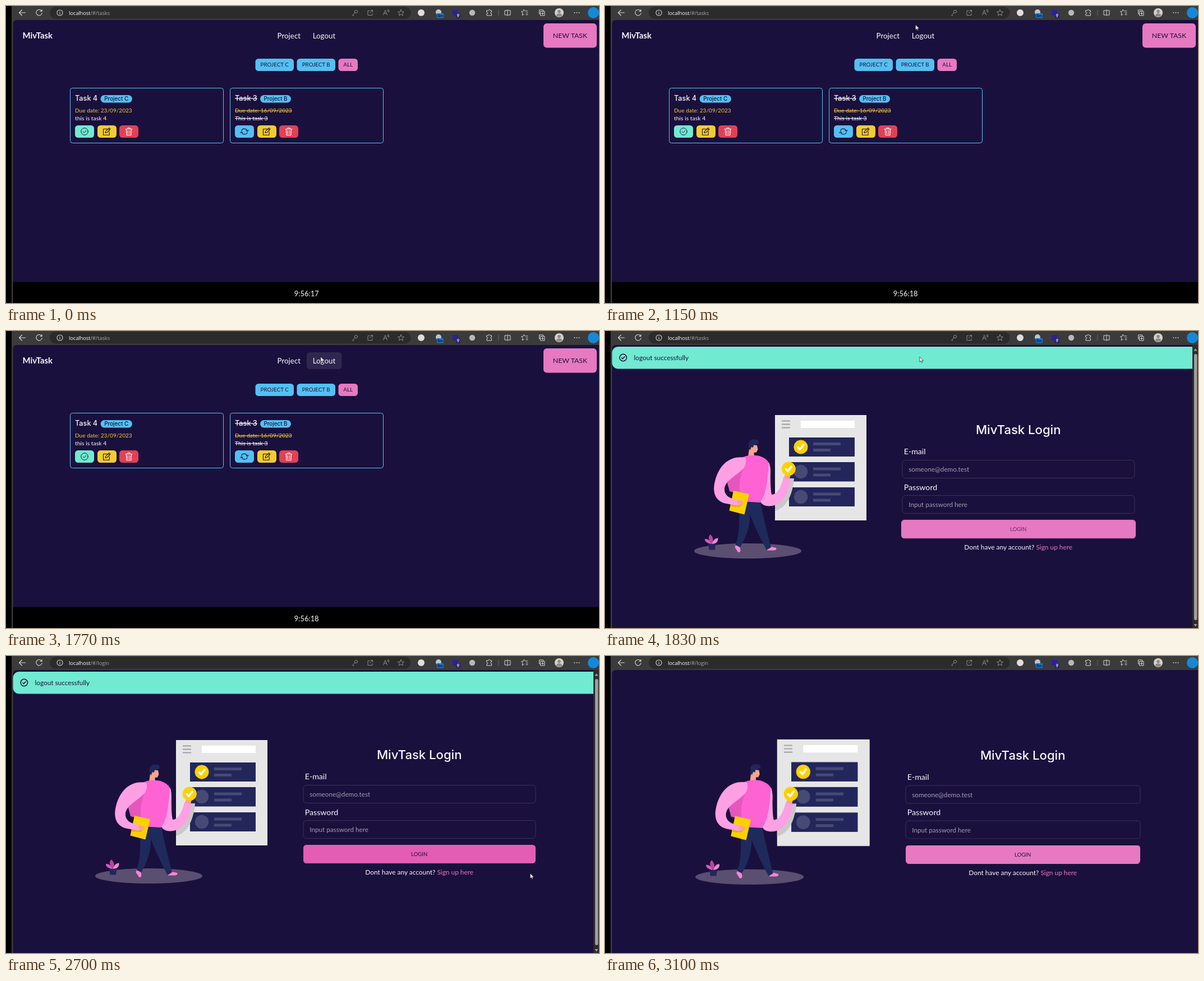
An HTML page for the animation above (3800 ms loop, 1057 px wide and 530 px high).

```html
<!DOCTYPE html>
<html lang="en">
<head>
<meta charset="utf-8">
<title>Task list</title>
<style>
html, body { margin: 0; height: 100%; overflow: hidden; background: #000; }
svg { display: block; width: 100vw; height: 100vh; }
text { font-family: Lato, "Open Sans", sans-serif; fill: #f9f7fd; }
.head, .badge { font-family: Inter, Roboto, sans-serif; font-weight: 500; }
.url { font: 9.5px "Open Sans", "Noto Sans", sans-serif; letter-spacing: -.15px; }
.url tspan { fill: #a3a3a3; }
.mid { text-anchor: middle; }
.dark { fill: #1f1238; }
.due { font-size: 10.1px; fill: #f3cc30; }
.note { font-size: 10.4px; }
.badge { font-size: 9.8px; }
.nav { font-size: 13.4px; }
.tab { font-size: 9.8px; }
.label { font-size: 14.2px; }
.hint { font-size: 11.7px; fill: #a29cb3; }
.done text { text-decoration: line-through; }
.done .badge { text-decoration: none; }
.field { fill: none; stroke: #3b3258; }
.line { fill: none; stroke-linecap: round; stroke-linejoin: round; }

/* one 3800 ms clock for everything */
.anim { animation: 3800ms linear infinite; }
.cut { animation: 3800ms step-end infinite; }

.first { animation-name: first; }
.second { animation-name: second; }
@keyframes first { 0% { visibility: visible } 18.1%, 100% { visibility: hidden } }
@keyframes second { 0% { visibility: hidden } 18.1%, 100% { visibility: visible } }

.tasks { animation-name: tasks; }
.login { animation-name: login; }
@keyframes tasks { 0% { visibility: visible } 48.12%, 100% { visibility: hidden } }
@keyframes login { 0% { visibility: hidden } 48.12%, 100% { visibility: visible } }
.tasks .cut { visibility: inherit; }
.clock { animation-name: clock; }
@keyframes clock { 0% { opacity: 1 } 48.12%, 100% { opacity: 0 } }

.old { animation-name: old; }
.new { animation-name: new; }
@keyframes old { 0% { visibility: visible } 56.8%, 100% { visibility: hidden } }
@keyframes new { 0% { visibility: hidden } 56.8%, 100% { visibility: visible } }

.toast { animation-name: toast; }
@keyframes toast { 0% { visibility: hidden } 48.12% { visibility: visible } 77.9%, 100% { visibility: hidden } }

/* the page widens when the scrollbar leaves */
.art { animation-name: art; }
.left { animation-name: left; }
.center { animation-name: center; }
.wide { animation-name: wide; }
@keyframes art { 0% { transform: none } 77.9%, 100% { transform: translate(.06px, -2.98px) scale(1.0122) } }
@keyframes left { 0% { transform: none } 77.9%, 100% { transform: translate(6px, .5px) } }
@keyframes center { 0% { transform: none } 77.9%, 100% { transform: translate(8px, .7px) } }
@keyframes wide { 0% { width: 414px } 77.9%, 100% { width: 418px } }

.pill { animation-name: pill; }
@keyframes pill { 0%, 26.8% { fill: #2b2b2b } 27.5%, 28.6% { fill: #333 } 29.8%, 100% { fill: #2b2b2b } }

.hover { animation-name: hover; }
@keyframes hover { 0%, 42.8% { opacity: 0 } 46.3%, 100% { opacity: .1 } }

.press { animation-name: press; transform-box: fill-box; transform-origin: center; }
@keyframes press {
  0%, 48.1% { transform: scale(1.01); fill: #e779c1 }
  52.6% { transform: none }
  65.8% { transform: none; fill: #e779c1 }
  69.2%, 71.2% { fill: #e35db4 }
  76.3%, 100% { transform: none; fill: #e779c1 }
}
.caption { animation-name: caption; }
@keyframes caption { 0%, 48.1% { opacity: .7 } 52.6%, 100% { opacity: 1 } }

.cursor { animation-name: move; }
.shown { animation-name: shown; }
@keyframes shown { 0% { visibility: hidden } 12.6% { visibility: visible } 78%, 100% { visibility: hidden } }
@keyframes move {
  0%, 13.2% { transform: translate(883.5px, 510px) }
  17% { transform: translate(790px, 345px) }
  20.5% { transform: translate(630px, 90px) }
  23.1%, 26.8% { transform: translate(552px, -14px) }
  28.8% { transform: translate(551px, 12px) }
  30.3%, 31.6% { transform: translate(553.5px, 33.5px) }
  37.9%, 56.8% { transform: translate(560.8px, 45.8px) }
  60.5% { transform: translate(660px, 130px) }
  65.8% { transform: translate(870px, 318px) }
  69.2% { transform: translate(922px, 360px) }
  71.1% { transform: translate(934.5px, 388px) }
  72.9% { transform: translate(972px, 432px) }
  74.5% { transform: translate(1002px, 467px) }
  77.9%, 100% { transform: translate(1048px, 534px) }
}
</style>
</head>
<body>
<svg viewBox="0 0 1057 530">
<defs>
  <g id="tick" class="line" stroke="#1f1238"><circle r="6.2"/><path d="M-2.6 .2L-.7 2.1L2.8-1.7"/></g>
  <g id="edit" class="line" stroke="#1f1238" stroke-width="1.1">
    <path d="M1-4.5H-6V6.3H4.6V0M-2.5 2.5L-1.8-.4L4.3-6.4L6.5-4.2L.4 1.8Z M2.8-4.9L5-2.7"/>
  </g>
  <g id="trash" class="line" stroke="#fff" stroke-width="1.1">
    <path d="M-5.8-4.5H5.8M-2-4.6V-6.5H2V-4.6M-4.7-4.4L-4 6.5H4L4.7-4.4M-1.9-2L-1.6 4.2M1.9-2L1.6 4.2"/>
  </g>
  <g id="cycle" class="line" stroke="#1f1238" stroke-width="1.1">
    <path d="M-5.2-1C-4.5-6.2 3.5-6.2 5.2-1M5.2 1C4.5 6.2-3.5 6.2-5.2 1M3-1.5L5.3-.8L7.3-2.2M-3 1.5L-5.3 .8L-7.3 2.2"/>
  </g>
  <g id="card">
    <rect x="114.5" y="146.5" width="273" height="98" rx="4" fill="none" stroke="#58c7f3"/>
    <rect x="163" y="213" width="34" height="22" rx="5.5" fill="#f3cc30"/>
    <rect x="202" y="213" width="34" height="22" rx="5.5" fill="#e24056"/>
    <use href="#edit" x="179.5" y="224"/><use href="#trash" x="219" y="224"/>
  </g>
  <path id="star" d="M0-5.5L1.6-1.8L5.5-1.5L2.5 1.1L3.5 5L0 2.9L-3.5 5L-2.5 1.1L-5.5-1.5L-1.6-1.8Z"/>
  <g id="bars" fill="#474a75"><path d="M371 199h49v5h-49zM371 210h31v5h-31z"/></g>
  <g id="medal"><circle r="12.5" fill="#ffd000"/><path class="line" d="M-5 .5L-1.4 4.2L5-4" stroke="#fff" stroke-width="3.6"/></g>
</defs>

<rect width="1057" height="530"/>
<rect x="10" width="1047" height="530" fill="#3b3b3b"/>
<path d="M12.5 530V32Q12.5 25 19.5 25H1057V530Z" fill="#1a103d"/>

<!-- browser bar -->
<rect class="anim pill" x="78" y="1.5" width="643.5" height="21" rx="10.5" fill="#2b2b2b"/>
<g class="line" stroke="#d8d8d8" stroke-width="1.1">
  <path d="M34.5 12H23.5M28.5 7L23.5 12L28.5 17M63.5 9A5.2 5.2 0 1 0 64.2 12.5M64 6.5V9.5H61"/>
  <circle cx="96" cy="12" r="5"/><path d="M96 11.5V14.5M96 9.3V9.5"/>
</g>
<text class="url cut old" x="112" y="15.5">localhost<tspan>/#/tasks</tspan></text>
<text class="url cut new" x="112" y="15.5">localhost<tspan>/#/login</tspan></text>
<g class="line" stroke="#8b8b8b">
  <circle cx="624" cy="10" r="2.6"/><path d="M622 12L617.8 16.2V17H620M648 8.5H645V16.5H653V13.5M650 7.5H653.5V11M653.3 7.7L648.5 12.5"/>
  <path d="M672.5 16L676 7.5L679.5 16M674 13H678M680 7Q681.3 8.3 680.8 10.3M681.5 6Q683.5 8 682.5 11"/>
  <use href="#star" x="704" y="12"/>
</g>
<circle cx="740" cy="12" r="6" fill="#e4dcdc"/>
<circle cx="771" cy="11" r="5" fill="#b9c4cf"/>
<rect x="768" y="13" width="12" height="8.5" rx="1" fill="#1976d2"/>
<text class="mid" x="774" y="20" font-size="7" font-weight="700" style="fill:#061a33">8m</text>
<rect x="796" y="7" width="10" height="10" fill="#2d209b"/>
<rect x="802" y="13" width="8" height="9" rx="1" fill="#28246f"/>
<text class="mid" x="806" y="20.3" font-size="7.5" font-weight="700">9</text>
<circle cx="831" cy="12" r="5.2" fill="#b8b8b8"/>
<g class="line" stroke="#d8d8d8">
  <path d="M857 8H860C859.5 5.8 863.2 5.8 862.8 8H865.5V11C863 10.5 863 14 865.5 13.5V17H857V13.8C859.5 14.2 859.5 10.6 857 11Z"/>
  <path d="M878 7V17" stroke="#666"/>
  <path d="M893 8H889V16H893M895 8H899V16H895M894 6.5V17.5M926 9H930M927 12.5H930M927 15.5H930"/>
  <path d="M925 8.8L923.2 6.2L921.8 9.6L918.5 10L921 12.4L920.2 16.5L923.2 14.7"/>
  <path d="M952 14H950.5V7H957.5V8.5M953 9.5H960V17H953ZM956.5 11.2V15.3M954.5 13.2H958.5"/>
</g>
<circle cx="986" cy="12" r="8" fill="#d5d0cc"/>
<circle cx="986" cy="9.7" r="2.8" fill="#8e8985"/><path d="M980.8 17.2Q981 13.2 986 13.2T991.2 17.2Q986 21.4 980.8 17.2Z" fill="#8e8985"/>
<g fill="#d8d8d8"><circle cx="1013.5" cy="12" r=".9"/><circle cx="1017.5" cy="12" r=".9"/><circle cx="1021.5" cy="12" r=".9"/></g>
<circle cx="1047" cy="12" r="10" fill="#1688d8"/>

<!-- task list -->
<g class="cut tasks">
  <text x="29.5" y="58" font-size="14.8" font-weight="700">MivTask</text>
  <rect class="anim hover" x="536" y="38" width="62.5" height="30" rx="5.5" fill="#f9f7fd" opacity="0"/>
  <text class="nav mid" x="504.3" y="58">Project</text>
  <text class="nav mid" x="567" y="58">Logout</text>
  <rect x="958" y="31" width="95" height="43.5" rx="6" fill="#e779c1"/>
  <text class="dark mid" x="1005.5" y="57" font-size="12.3">NEW TASK</text>

  <rect x="444.5" y="94" width="68.5" height="22" rx="5.5" fill="#53c0f3"/>
  <rect x="518.5" y="94" width="68.5" height="22" rx="5.5" fill="#53c0f3"/>
  <rect x="592.5" y="94" width="34.5" height="22" rx="5.5" fill="#e779c1"/>
  <text class="tab dark mid" x="478.7" y="108.3">PROJECT C</text>
  <text class="tab dark mid" x="552.7" y="108.3">PROJECT B</text>
  <text class="tab dark mid" x="609.7" y="108.3">ALL</text>

  <use href="#card"/>
  <text class="head" x="123" y="169" font-size="12.7">Task 4</text>
  <rect x="168.5" y="159" width="56.5" height="13.5" rx="6.7" fill="#53c0f3"/>
  <text class="badge dark mid" x="196.7" y="169.2">Project C</text>
  <text class="due" x="123" y="190.3">Due date: 23/09/2023</text>
  <text class="note" x="123" y="204">this is task 4</text>
  <rect x="123" y="213" width="34" height="22" rx="5.5" fill="#71ead2"/>
  <use href="#tick" x="140" y="224"/>

  <g class="done" transform="translate(285)">
    <use href="#card"/>
    <text class="head" x="123" y="169" font-size="12.7">Task 3</text>
    <rect x="168" y="159" width="55" height="13.5" rx="6.7" fill="#53c0f3"/>
    <text class="badge dark mid" x="195.5" y="169.2">Project B</text>
    <text class="due" x="123" y="190.3">Due date: 16/09/2023</text>
    <text class="note" x="123" y="204">This is task 3</text>
    <rect x="123" y="213" width="34" height="22" rx="5.5" fill="#53c0f3"/>
    <use href="#cycle" x="140" y="224"/>
  </g>

  <rect x="12.5" y="492.5" width="1045" height="38"/>
  <g class="cut clock" font-size="12.9">
    <text class="mid cut first" x="535.7" y="518.3">9:56:17</text>
    <text class="mid cut second" x="535.7" y="518.3">9:56:18</text>
  </g>
</g>

<!-- login -->
<g class="cut login">
  <g class="cut art">
    <ellipse cx="254.5" cy="392.5" rx="95.5" ry="13.5" fill="#5a4f70"/>
    <path d="M303 150h163v188H303z" fill="#e6e6e6"/>
    <path d="M315 160.5h15M315 166.5h15M315 172.5h15" stroke="#9d9da2" stroke-width="1.8"/>
    <path d="M349 160h96v13h-96z" fill="#fff"/>
    <path d="M328 190h117v34H328zM328 234h117v34.5H328zM328 279h117v34H328z" fill="#23265a"/>
    <use href="#bars"/><use href="#bars" y="44.5"/><use href="#bars" y="89.5"/>
    <circle cx="349" cy="251" r="12.2" fill="#474a75"/><circle cx="349" cy="296" r="12.2" fill="#474a75"/>
    <use href="#medal" x="349" y="207"/>
    <path d="M303 321C322 316 334 296 337 263H326L303 300Z" fill="#c9c9c9"/>
    <path d="M328 268.5H336.5L334.8 279H328Z" fill="#c9c9c9"/>

    <path d="M184 379h13.5l-1.5 11.5h-10.5z" fill="#23265a"/>
    <path d="M188 380Q177 377 178 371Q187 371 189.5 380Z" fill="#d75fb8"/>
    <path d="M190 380Q181 369 188 363Q195 370 191.5 380Z" fill="#b8479c"/>
    <path d="M191 380Q193 370 201.5 369.5Q202 379 191 380Z" fill="#ff85d6"/>

    <path d="M233 381L239 380L241.5 391Q241 396 237 394.5L231.5 386Z" fill="#ff85d6"/>
    <path d="M289 386L296 385L305 387Q307 391 301 391.5H289Z" fill="#ff85d6"/>
    <path d="M241 302H276C281 325 289 360 296 386L288 391C276 368 265 345 258 326C259 350 250 371 241 386L232.5 382C243 355 237 330 241 302Z" fill="#1f2a5c"/>
    <path d="M258 203L271 204L272.5 211L270 216.5L265.5 217L266 224L255 225Z" fill="#f5a58c"/>
    <path d="M256 208C254 197 261 192 267 194C271 192 275 196 273.5 201L265 203.5L264 208L261 207L258.5 213Z" fill="#1f2759"/>
    <path d="M240 228C250 221 268 220 278 224C293 230 296 240 295 256L284 302L276 306L242 304C238 285 238 270 242 250Z" fill="#ff62d3"/>
    <path d="M247 245C232 257 222 263 218 271L222 286L241 291C238 275 240 262 247 245Z" fill="#e657bd"/>
    <path d="M229 285L257 291L248.5 327.5L221.5 320.5Z" fill="#ffd000"/>
    <path d="M225 305L246 309L240 314L223 313Z" fill="#e0b000"/>
    <path d="M250 226C222 221 203 240 196 268C190 292 200 305 216 308L238 312L240 302C226 300 214 296 213 284C212 268 232 260 246 246C252 240 252 230 250 226Z" fill="#ffa0e4"/>
    <path d="M236 303C241 301 246 303 246.5 307Q245 312 237 311Z" fill="#f5a58c"/>
    <path d="M292 234C297 245 293 270 297 292C306 292 314 280 318 261L331 264C328 290 316 309 298 312C286 314 278 309 277 304C286 296 290 270 292 234Z" fill="#ffa0e4"/>
    <path d="M319 262L321 256H331L329 264Z" fill="#f5a58c"/>
    <use href="#medal" x="327.3" y="246"/>
  </g>

  <text class="head mid cut center" x="736.7" y="184" font-size="22.1">MivTask Login</text>
  <g class="cut left">
    <text class="label" x="532.7" y="220.3">E-mail</text>
    <rect class="field cut wide" x="530" y="230.5" width="414" height="32" rx="5.5"/>
    <text class="hint" x="541.3" y="251">someone@demo.test</text>
    <text class="label" x="532.7" y="283.5">Password</text>
    <rect class="field cut wide" x="530" y="293.5" width="414" height="32" rx="5.5"/>
    <text class="hint" x="541.3" y="314.3">Input password here</text>
    <g class="anim press" fill="#e779c1"><rect class="cut wide" x="530" y="337" width="414" height="33" rx="5.5"/></g>
  </g>
  <g class="cut center">
    <text class="dark mid anim caption" x="736.7" y="357" font-size="9.6">LOGIN</text>
    <text class="mid" x="736.7" y="390.3" font-size="11.9">Dont have any account? <tspan fill="#e779c1">Sign up here</tspan></text>
  </g>
</g>

<g class="cut toast">
  <rect x="12.5" y="28" width="1060" height="39.5" rx="11" fill="#71ead2"/>
  <use href="#tick" x="32.3" y="47.5" stroke-width="1.5"/>
  <text class="dark" x="51.5" y="51.5" font-size="11.8">logout successfully</text>
  <rect x="1047" y="25" width="10" height="505" fill="#2c2c2c"/>
  <rect x="1050" y="41" width="5.5" height="475" rx="2.7" fill="#9f9f9f"/>
  <path d="M1049.5 35.5L1052.5 31L1055.5 35.5ZM1049.5 523L1052.5 527.5L1055.5 523Z" fill="#9f9f9f"/>
</g>

<g class="cut shown">
  <path class="anim cursor" d="M0 0V9.4L2.1 7.5L3.5 10.5L5 9.9L3.7 6.9H6.6Z" fill="#fff" stroke="#111" stroke-width=".7"/>
</g>
</svg>
</body>
</html>
```
